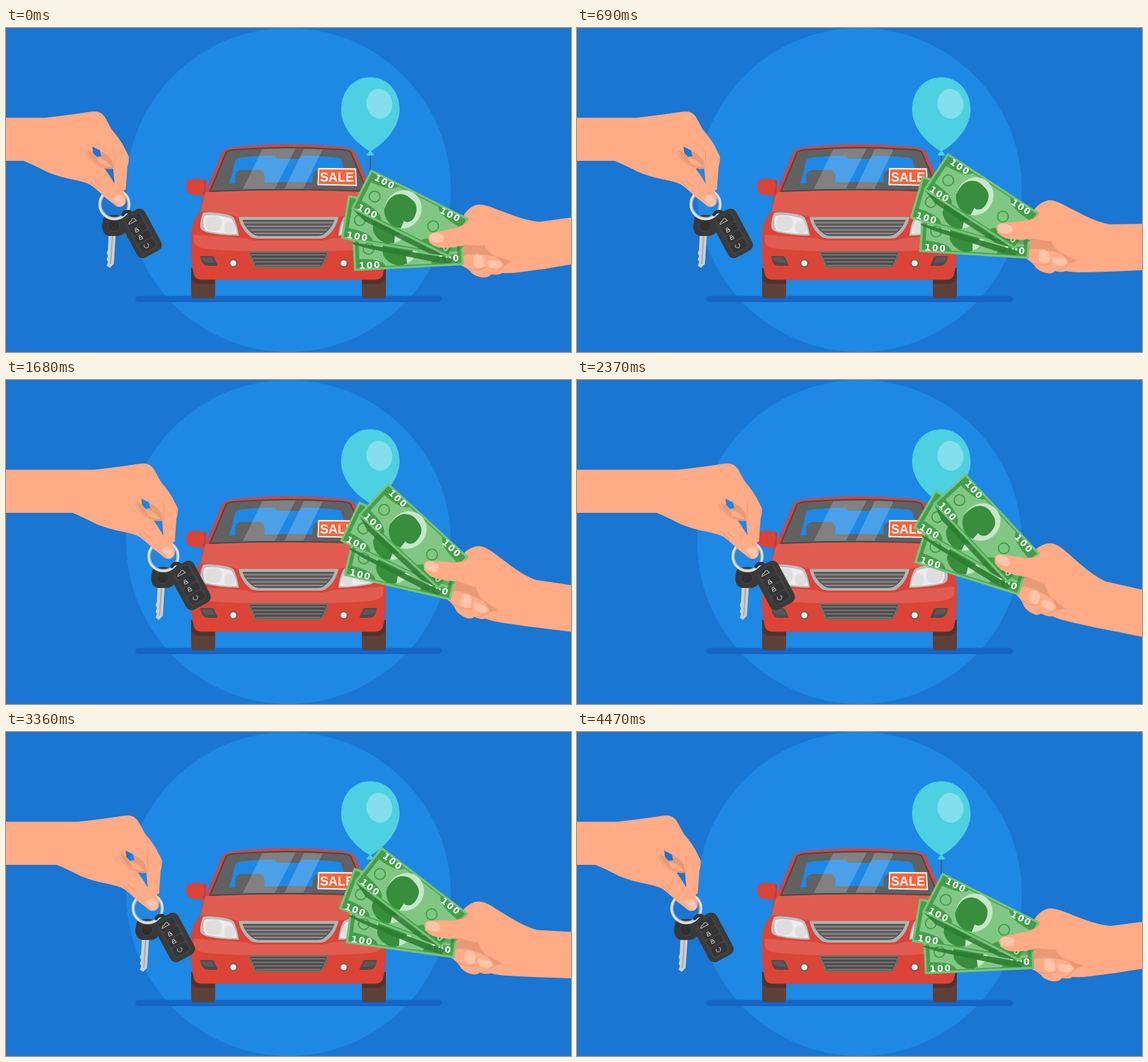
Animation of 870x500 px, one loop 4500 ms. Source, as an HTML page:

```html
<!DOCTYPE html>
<html lang="en">
<head>
<meta charset="utf-8">
<title>Car sale</title>
<style>
  html, body { margin: 0; width: 100%; height: 100%; overflow: hidden; background: #1976d2; }
  svg { display: block; width: 100%; height: 100%; }
  .sale { font: bold 19.6px "Liberation Sans", Arial, sans-serif; fill: #fff; }
  .value { font: bold 13.5px "DejaVu Sans", sans-serif; letter-spacing: 2px; text-anchor: middle; fill: #fff; }
  .skin { fill: #ffab85; }
  .shade { fill: #e89a77; }
  .nail { fill: #ffc4a9; }
  .crease { fill: none; stroke: #e89a77; stroke-width: 1.2; stroke-linecap: round; }
  .icon { fill: none; stroke: #c4c4c4; stroke-width: 1; stroke-linejoin: round; stroke-linecap: round; }
</style>
</head>
<body>
<svg viewBox="0 0 870 500">
  <defs>
    <g id="side">
      <path fill="#5d4037" d="M285 370H322V411Q322 417 316 417H291Q285 417 285 411Z"/>
      <path fill="#4e342e" d="M285 370H322V395H298Q287 394 285 386Z"/>
      <path fill="#db4437" d="M308 235Q296 231 284 234Q277 236 277 242Q277 252 283 256Q295 260 308 258Z"/>
      <path fill="#c93b30" d="M305 235H308V257H303Q307 247 305 235Z"/>
    </g>
    <g id="front">
      <path fill="#bdbdbd" d="M303 286Q306 283 322 285Q344 287 350 292Q356 302 358.500 320.500Q330 320 308 315Q299 312 299 306Q299 296 303 286Z"/>
      <path fill="#ebebeb" d="M305 290Q320 286 347 294Q354 304 356 318Q330 318 309 313Q302 309 305 290Z"/>
      <rect x="307" y="290" width="25" height="23" rx="9" fill="#dedede"/>
      <rect x="336" y="299" width="17" height="18" rx="7" fill="#dedede"/>
      <path fill="#4c4c4c" d="M299 352H317Q320 352 321 355L326 367H310Q303 366 301 360Z"/>
      <path fill="#595959" d="M301 354H317L321 362Q308 363 303 359Z"/>
      <circle cx="350" cy="363" r="6.500" fill="#616161"/>
      <circle cx="350" cy="363" r="4.600" fill="#ececec"/>
    </g>
    <path id="seat" fill="#616161" d="M353 241V229Q354 219 364 219H388Q397 219 398 229V241Z"/>
    <g id="bill">
      <rect width="169" height="68" fill="#76c37a"/>
      <rect x="3.500" y="3.500" width="162" height="61" fill="#43a047"/>
      <path fill="#81c784" d="M9 18Q45 17 49 5H119Q123 17 160 18V50Q123 51 119 63H49Q45 51 9 50Z"/>
      <g fill="none" stroke="#43a047" stroke-width="2">
        <circle cx="24" cy="35" r="8.300"/>
        <circle cx="125" cy="35.500" r="8.300"/>
      </g>
      <ellipse cx="72" cy="33" rx="28" ry="30" fill="#c8e6c9"/>
      <path fill="#388e3c" d="M46 46Q43 25 53 17Q62 9 75 13Q89 15 92 28Q95 41 89 46Q84 50 81 48L82 61Q70 66 59 60Q50 55 46 46Z"/>
      <g class="value">
        <text x="28" y="12.500">100</text>
        <text x="25" y="65">100</text>
        <text x="141" y="12.500">100</text>
        <text x="147" y="61">100</text>
      </g>
    </g>
    <clipPath id="mid"><rect width="169" height="68" transform="translate(527 258) rotate(9.500)"/></clipPath>
    <clipPath id="low"><rect width="169" height="68" transform="translate(532.500 307) rotate(-3)"/></clipPath>
    <clipPath id="glass"><path d="M316 250L341 191Q435 181 529 191L554 250Q435 246 316 250Z"/></clipPath>
  </defs>

  <rect width="870" height="500" fill="#1976d2"/>
  <circle cx="435" cy="250" r="250" fill="#1e88e5"/>
  <rect x="199" y="413.500" width="472" height="9.500" rx="4.700" fill="#1565c4"/>

  <g id="balloon">
    <path d="M561 194V262" stroke="#5d4a5c" stroke-width="1.600"/>
    <path fill="#4dd0e1" d="M561 76C588 76 606 98 606 126C606 155 580 180 562 190L567 196Q561 198 555 196L560 190C542 180 516 155 516 126C516 98 534 76 561 76Z"/>
    <ellipse cx="575" cy="117" rx="20" ry="23" fill="#82dfeb" transform="rotate(-10 575 117)"/>
  </g>

  <g id="car">
    <use href="#side"/>
    <use href="#side" transform="translate(870) scale(-1 1)"/>
    <path fill="#db4437" d="M303 262L333 192Q336 186 350 184Q435 175 520 184Q534 186 537 192L567 262L571 284Q583 295 585 315V345Q585 366 580 382Q577 388.500 568 388.500H302Q293 388.500 290 382Q285 366 285 345V315Q287 295 299 284Z"/>
    <path fill="#e15c50" d="M308 253Q435 247 562 253Q567 266 571 283Q540 284 514 291H356Q330 284 300 283Q303 266 308 253Z"/>
    <path fill="#e15c50" d="M289 319Q330 322 366 324L382 328H488L504 324Q540 322 581 319V329Q580 338 560 341Q500 346 435 346Q370 346 310 341Q290 338 289 329Z"/>
    <path fill="#616161" stroke="#484848" stroke-width="2" d="M314 252L339 192Q341 189 350 188Q435 181 520 188Q529 189 531 192L556 252Q435 247 314 252Z"/>
    <path fill="#1e88e5" d="M344 240L353 205Q354 201 360 200Q385 197 414 197Q416 202 422 202H448Q453 202 455 197Q485 197 510 200Q516 201 517 205L526 240Q435 237 344 240Z"/>
    <use href="#seat"/>
    <use href="#seat" transform="translate(870) scale(-1 1)"/>
    <path fill="#616161" d="M340 241Q435 234 530 241V246H340Z"/>
    <path clip-path="url(#glass)" fill="#fff" fill-opacity=".2" d="M396 184H447L412 252H363ZM460 184H489L456 252H427Z"/>
    <path fill="#ff6237" stroke="#fff" stroke-width="1.800" d="M481.500 217L538 217.500L539.500 243L480.500 241.500Z"/>
    <text class="sale" x="483.500" y="236.700">SALE</text>
    <use href="#front"/>
    <use href="#front" transform="translate(870) scale(-1 1)"/>
    <path fill="#b3b3b3" d="M358 291.500H512Q508 312 492 323Q488 325 480 325H390Q382 325 378 323Q362 312 358 291.500Z"/>
    <path fill="#5c5c5c" d="M364 296H506Q501 311 488 319Q485 321 478 321H392Q385 321 382 319Q369 311 364 296Z"/>
    <path stroke="#8c8c8c" stroke-width="2.200" d="M366 300.500H504M370 306H500M376 311.500H494M382 317H488"/>
    <path fill="#6e6e6e" d="M372 344.500H498L488 367Q486 370 481 370H389Q384 370 382 367Z"/>
    <path fill="#4c4c4c" d="M376 347H494L485 368H385Z"/>
    <path stroke="#767676" stroke-width="2" d="M378 350H492M380 355.500H490M383 361H487M385 366.500H485"/>
  </g>

  <g id="keys">
    <path fill="#cfcfcf" d="M158 318H169L166 364L160 370L155 367L157 361L155 357L157 352L155 347L157 342Z"/>
    <path stroke="#a8a8a8" stroke-width="2" d="M164 320L161 364"/>
    <path fill="#383838" d="M150 293Q160 286 178 290L186 311Q182 320 172 321H158Q148 318 148 306Z"/>
    <circle cx="166" cy="305" r="9" fill="#303030" stroke="#454545"/>
    <g transform="translate(208 317) rotate(-28)">
      <rect x="-21" y="-36" width="42" height="72" rx="10" fill="#3a3a3a"/>
      <rect x="-15" y="-31" width="30" height="62" rx="7" fill="#424242"/>
      <g fill="#343434">
        <rect x="-12" y="-30" width="24" height="15" rx="4"/>
        <rect x="-12" y="-14" width="24" height="12" rx="3"/>
        <rect x="-12" y="0" width="24" height="12" rx="3"/>
        <rect x="-12" y="14" width="24" height="14" rx="4"/>
      </g>
      <path class="icon" d="M-10 -21Q-9 -24 -5 -24L-2 -26H1L3 -21ZM-6 -8H-1V-5H-6ZM-5 -8V-11H-2V-9M-6 5H-1V8H-6ZM-5 5V2H-2V5M-4 18A3.500 3.500 0 1 0 1 18"/>
    </g>
    <circle cx="167" cy="272" r="22.300" fill="none" stroke="#a9b1b5" stroke-width="5"/>
    <circle cx="167" cy="272" r="22.800" fill="none" stroke="#dce1e3" stroke-width="3"/>
    <path fill="none" stroke="#333" stroke-width="5" stroke-linecap="round" d="M180 288Q184 281 191 284"/>
    <path class="skin" fill-rule="evenodd" d="M-120 138.500H60Q100 134 132 129Q145 127 152 137L163 157Q175 171 181 182L189 198Q190 203 187 214L184.500 249L180 252Q186 262 184 270Q179 279 170 275L152 261Q140 249 130 242Q120 237 104 234Q82 230 63 222Q42 211 27 205H-120ZM133 183L145 189L147 198L140 199L134 193ZM152 217L165 217L167 240Q160 228 152 217Z"/>
    <path class="shade" d="M125 188L134 193L140 199L147 198L145 190Q155 193 164 205L165 217Q154 220 144 211Q129 203 125 188Z"/>
    <path class="skin" d="M139 200Q151 200 163 214Q151 215 143 208Z"/>
    <path class="crease" d="M166 190Q169 202 165 217M123 191Q130 207 148 215M130 237L139 247M137 236L144 243M187 200L188 205"/>
    <path class="nail" d="M164 262Q170 256 178 258Q184 265 182 272Q178 277 172 273Z"/>
  </g>

  <g id="cash">
    <path class="skin" d="M1010 273.500L822 299Q805 298 780 289L746 276Q732 271 724 273Q714 276 706 287L690 320L700 366Q712 371 718 379Q726 385 738 385Q745 384 747 380Q758 382 764 378Q777 379 790 377Q830 372 870 365L1010 343Z"/>
    <path class="shade" d="M704 334H736Q740 343 752 352L734 349Q718 345 704 352Z"/>
    <path class="crease" d="M706 349Q735 347 760 354Q769 358 770 366M712 371Q728 376 739 369M747 380Q758 379 768 365"/>
    <path class="shade" d="M752 352L780 360L767 366Q763 358 752 352Z"/>
    <path class="nail" d="M720 353Q727 345 735 354Q739 364 735 369Q727 372 720 366ZM740 361Q745 356 760 360Q766 364 762 369Q754 373 744 369Z"/>
    <use href="#bill" transform="translate(532.500 307) rotate(-3)"/>
    <path clip-path="url(#low)" fill="#2e7d32" fill-opacity=".9" d="M516 328L683 355L688 357L684 363L664 362L556 340Z"/>
    <use href="#bill" transform="translate(527 258) rotate(9.500)"/>
    <path clip-path="url(#mid)" fill="#2e7d32" fill-opacity=".85" d="M532 278L683 354L690 359L676 360L552 298Z"/>
    <use href="#bill" transform="translate(562 218) rotate(26.700)"/>
    <path fill="#2e7d32" fill-opacity=".4" d="M655 333Q675 344 706 336L696 345Q670 346 655 333Z"/>
    <path class="skin" d="M727 280L712 296Q706 305 690 309L662 315Q649 317 650 325Q653 337 670 339Q690 340 706 334L735 336Z"/>
    <path class="nail" d="M652 320Q660 314 672 319Q677 325 672 330Q660 334 653 328Z"/>
    <path class="crease" d="M688 309Q703 308 712 297"/>
  </g>
</svg>
<script>
  const LOOP = 4500, STEP = 30, SLIDE = 101, TILT = 21.6;
  const keys = document.getElementById("keys");
  const cash = document.getElementById("cash");

  function draw(now) {
    const t = Math.floor((now % LOOP) / STEP) * STEP;
    const k = 1 - Math.abs(1 - 2 * t / LOOP);
    keys.setAttribute("transform", `translate(${SLIDE * k} 0)`);
    cash.setAttribute("transform", `rotate(${TILT * k} 785.5 281.5)`);
  }

  let start;
  function tick(now) {
    start ??= now;
    draw(now - start);
    requestAnimationFrame(tick);
  }
  draw(0);
  requestAnimationFrame(tick);
</script>
</body>
</html>
```
